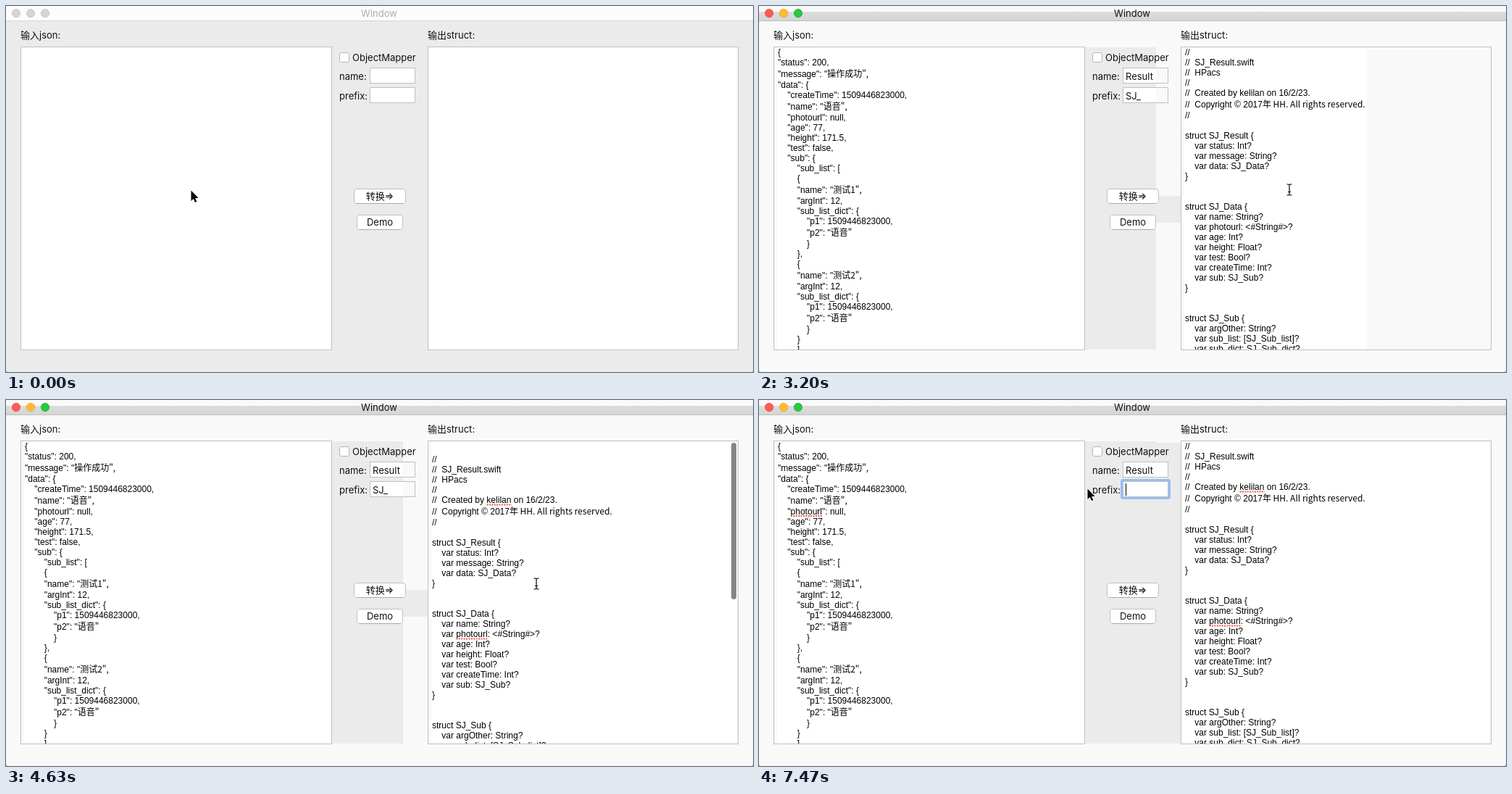
Animation of 1031x505 px, one loop 8 s. Source, as an HTML page:

```html
<!DOCTYPE html>
<html lang="zh">
<head>
<meta charset="utf-8">
<title>Window</title>
<style>
html, body { margin: 0; width: 100%; height: 100%; overflow: hidden; background: #b9bdc1; }
svg { display: block; width: 1031px; height: 505px; border-radius: 0 0 4px 4px; }
text { font: 13px Inter, "Noto Sans CJK SC", sans-serif; white-space: pre; fill: #111; }
.code text { font: 12px "Liberation Sans", Arial, sans-serif; fill: #000; }
.code .cjk { font-family: "Noto Sans CJK SC", sans-serif; }
.mid { text-anchor: middle; }
.line { fill: none; stroke: #c0c0c0; }
.ring { fill: none; stroke: #97bff5; stroke-width: 3; }
.spell { stroke: #f2554a; stroke-width: 2; stroke-dasharray: 2 1.4; }

/* Everything jumps, nothing glides: one 8 s clock with held steps */
.k { animation: 8s step-end -10ms infinite; }

@keyframes idle    { 0% { opacity: 1 } 22.125%, 100% { opacity: 0 } }
@keyframes press   { 0% { opacity: 0 } 22.125% { opacity: 1 } 24.375%, 100% { opacity: 0 } }
@keyframes loaded  { 0% { opacity: 0 } 24.375%, 100% { opacity: 1 } }
@keyframes output  { 0% { opacity: 0 } 28.75%, 100% { opacity: 1 } }
@keyframes cross   { 0% { opacity: 0 } 37.75%, 100% { opacity: 1 } }
@keyframes rolled  { 0% { opacity: 0 } 42.25%, 100% { opacity: 1 } }
@keyframes checked { 0% { opacity: 0 } 53.5%, 100% { opacity: 1 } }
@keyframes back    { 0% { opacity: 0 } 62.25%, 100% { opacity: 1 } }
@keyframes bar     { 0% { opacity: 0 } 42.25% { opacity: 1 } 73.375%, 100% { opacity: 0 } }
@keyframes blurred { 0% { opacity: 0 } 75.625%, 100% { opacity: 1 } }
@keyframes onName  { 0% { opacity: 0 } 75.625% { opacity: 1 } 80.125%, 100% { opacity: 0 } }
@keyframes onPrefix { 0% { opacity: 0 } 80.125%, 100% { opacity: 1 } }
@keyframes select  { 0% { opacity: 0 } 84.625% { opacity: 1 } 93.375%, 100% { opacity: 0 } }
@keyframes prefix  { 0% { opacity: 0 } 24.375% { opacity: 1 } 93.375%, 100% { opacity: 0 } }
@keyframes cleared { 0% { opacity: 0 } 93.375%, 100% { opacity: 1 } }

@keyframes scroll {
  0% { transform: translateY(0) }
  42.25% { transform: translateY(-25px) }
  44.5% { transform: translateY(-115px) }
  46.75% { transform: translateY(-210px) }
  49% { transform: translateY(-283px) }
  51.25% { transform: translateY(-300px) }
  53.5% { transform: translateY(-190px) }
  55.75% { transform: translateY(-40px) }
  57.875% { transform: translateY(18px) }
  60.125% { transform: translateY(4px) }
  62.25%, 100% { transform: translateY(0) }
}
@keyframes thumb {
  0% { transform: translateY(0); height: 226px }
  42.25% { transform: translateY(14px); height: 226px }
  44.5% { transform: translateY(63px); height: 226px }
  46.75% { transform: translateY(114px); height: 226px }
  49% { transform: translateY(154px); height: 226px }
  51.25% { transform: translateY(163px); height: 226px }
  53.5% { transform: translateY(103px); height: 226px }
  55.75% { transform: translateY(22px); height: 226px }
  57.875% { transform: translateY(0); height: 216px }
  60.125% { transform: translateY(0); height: 224px }
  62.25%, 100% { transform: translateY(0); height: 226px }
}
@keyframes move {
  0% { transform: translate(255px, 254px) }
  4.375% { transform: translate(283px, 262px) }
  6.625% { transform: translate(360px, 283px) }
  8.875% { transform: translate(455px, 302px) }
  11% { transform: translate(509px, 310px) }
  13.25% { transform: translate(511px, 301px) }
  35.5% { transform: translate(407px, 290px) }
  37.75% { transform: translate(575px, 262px) }
  40% { transform: translate(732px, 253px) }
  62.25% { transform: translate(500px, 150px) }
  64.5% { transform: translate(520px, 122px) }
  66.75% { transform: translate(541px, 106px) }
  68.875% { transform: translate(550px, 100px) }
  71.125% { transform: translate(551px, 98px) }
  73.375% { transform: translate(552px, 97px) }
  77.875% { transform: translate(556px, 108px) }
  80.125% { transform: translate(560px, 123px) }
  82.375% { transform: translate(535px, 124px) }
  84.625% { transform: translate(495px, 123px) }
  86.75%, 100% { transform: translate(453px, 122px) }
}
@keyframes arrow {
  0%, 37.75%, 62.25%, 86.75%, 100% { opacity: 1 }
  35.5%, 40%, 64.5% { opacity: 0 }
}
@keyframes beam {
  0%, 37.75%, 62.25%, 86.75%, 100% { opacity: 0 }
  35.5%, 40%, 64.5% { opacity: 1 }
}
@keyframes click {
  0%, 24.375%, 77.875%, 86.75%, 100% { opacity: 0 }
  22.125%, 75.625%, 80.125% { opacity: 1 }
}
</style>
</head>
<body>
<svg viewBox="0 0 1031 505">
  <defs>
    <linearGradient id="bar" x2="0" y2="1">
      <stop stop-color="#dcdcdc"/><stop offset="1" stop-color="#d5d5d5"/>
    </linearGradient>
    <linearGradient id="blue" x2="0" y2="1">
      <stop stop-color="#4c9bf8"/><stop offset=".48" stop-color="#3a8af5"/>
      <stop offset=".52" stop-color="#1d74f0"/><stop offset="1" stop-color="#0a63ea"/>
    </linearGradient>
    <clipPath id="paneL"><rect x="21" y="57" width="428" height="417"/></clipPath>
    <clipPath id="paneR"><rect x="583" y="57" width="427" height="417"/></clipPath>
    <g id="fills">
      <rect width="1031" height="505" fill="#ebebeb"/>
      <g fill="#fff">
        <rect x="20" y="56" width="430" height="419"/>
        <rect x="582" y="56" width="429" height="419"/>
        <rect x="502" y="85" width="63" height="22"/>
        <rect x="502" y="112" width="63" height="22"/>
        <rect x="460" y="64" width="14" height="14" rx="3"/>
        <rect x="480" y="252" width="72" height="21" rx="4"/>
        <rect x="484" y="288" width="64" height="21" rx="4"/>
      </g>
    </g>
  </defs>

  <rect width="1031" height="505" fill="#f9f9f9"/>
  <g id="patches"></g>

  <g>
    <rect y="8" width="1031" height="12" fill="url(#bar)"/>
    <path d="M0 20.5H1031" stroke="#c0c0c0"/>
    <circle cx="14" cy="10" r="5.7" fill="#fc5b57" stroke="#e2463f" stroke-width=".7"/>
    <circle cx="34" cy="10" r="5.7" fill="#fdbc2e" stroke="#dfa023" stroke-width=".7"/>
    <circle cx="54" cy="10" r="5.7" fill="#28c840" stroke="#1dac2b" stroke-width=".7"/>
    <text class="mid" x="515" y="15">Window</text>
  </g>
  <g class="k" style="animation-name:idle">
    <rect width="1031" height="20" fill="#fcfcfc"/>
    <path d="M0 20.5H1031" stroke="#d6d6d6"/>
    <g fill="#d4d4d4" stroke="#c2c2c2" stroke-width=".8">
      <circle cx="14" cy="10" r="5.6"/><circle cx="34" cy="10" r="5.6"/><circle cx="54" cy="10" r="5.6"/>
    </g>
    <text class="mid" x="515" y="15" style="fill:#adadad">Window</text>
  </g>

  <g class="line">
    <rect x="20.5" y="56.5" width="429" height="418"/>
    <rect x="582.5" y="56.5" width="428" height="418"/>
    <rect x="502.5" y="85.5" width="62" height="21"/>
    <rect x="502.5" y="112.5" width="62" height="21"/>
    <rect x="460.5" y="64.5" width="13" height="13" rx="2.5" stroke="#b4b4b4"/>
    <rect x="480.5" y="252.5" width="71" height="20" rx="3.5"/>
    <rect x="484.5" y="288.5" width="63" height="20" rx="3.5"/>
    <path d="M483.5 272.5H548.5M487.5 308.5H544.5" stroke="#aaa"/>
  </g>

  <text x="20" y="45">输入json:</text>
  <text x="582" y="45">输出struct:</text>
  <text x="478" y="76">ObjectMapper</text>
  <text x="460" y="102">name:</text>
  <text x="460" y="129">prefix:</text>
  <text class="mid" x="516" y="267">转换=&gt;</text>
  <text class="mid" x="516" y="303">Demo</text>
  <g class="k" style="animation-name:press">
    <rect x="484" y="288" width="64" height="21" rx="4" fill="url(#blue)"/>
    <text class="mid" x="516" y="303" style="fill:#fff">Demo</text>
    <path d="M26.5 57.5V71" stroke="#000"/>
  </g>

  <rect class="ring k" style="animation-name:onName" x="500.5" y="83.5" width="66" height="25" rx="2"/>
  <rect class="ring k" style="animation-name:onPrefix" x="500.5" y="110.5" width="66" height="25" rx="2"/>
  <rect class="k" style="animation-name:select" x="506" y="115" width="21" height="17" fill="#b3d7ff"/>
  <text class="k" style="animation-name:loaded" x="506" y="102">Result</text>
  <text class="k" style="animation-name:prefix" x="506" y="129">SJ_</text>
  <path class="k" style="animation-name:cleared" d="M506.5 115V132" stroke="#000"/>

  <g clip-path="url(#paneL)">
    <g id="json" class="code k" style="animation-name:loaded"></g>
    <path class="spell k" style="animation-name:blurred" d="M44 160H87"/>
  </g>
  <g clip-path="url(#paneR)">
    <g class="k" style="animation-name:scroll">
      <g id="swift" class="code k" style="animation-name:output"></g>
      <path class="spell k" style="animation-name:checked" d="M663.5 126.5H698M621.5 311.5H665"/>
    </g>
  </g>
  <g class="k" style="animation-name:bar">
    <rect class="k" style="animation-name:thumb" x="1001" y="59" width="7" height="226" rx="3.5" fill="#858585"/>
  </g>

  <g class="k" style="animation-name:move">
    <g class="k" style="animation-name:click" fill="none">
      <circle cx="2" r="9.5" stroke="#fff" stroke-width="3.5"/>
      <circle cx="2" r="9.5" stroke="#111" stroke-width="1.5"/>
    </g>
    <path class="k" style="animation-name:arrow" d="M.5 .5V15L3.8 11.9 6 17 8.3 16 6.1 11H10.6Z"
      stroke="#fff" stroke-width="1.6" paint-order="stroke"/>
    <g class="k" style="animation-name:beam" fill="none">
      <path id="ibeam" d="M-3.5-7H-1.5L0-6 1.5-7H3.5M0-6V7M-3.5 8H-1.5L0 7 1.5 8H3.5M-2 3.5H2" stroke="#fff" stroke-width="2.4" stroke-opacity=".7"/>
      <path d="M-3.5-7H-1.5L0-6 1.5-7H3.5M0-6V7M-3.5 8H-1.5L0 7 1.5 8H3.5M-2 3.5H2" stroke="#000" stroke-width="1.2"/>
    </g>
  </g>
</svg>

<script>
const json = `{
"status": 200,
"message": "操作成功",
"data": {
    "createTime": 1509446823000,
    "name": "语音",
    "photourl": null,
    "age": 77,
    "height": 171.5,
    "test": false,
    "sub": {
        "sub_list": [
        {
        "name": "测试1",
        "argInt": 12,
        "sub_list_dict": {
            "p1": 1509446823000,
            "p2": "语音"
            }
        },
        {
        "name": "测试2",
        "argInt": 12,
        "sub_list_dict": {
            "p1": 1509446823000,
            "p2": "语音"
            }
        }
        ]`;

const header = `//
//  SJ_Result.swift
//  HPacs
//
//  Created by kelilan on 16/2/23.
//  Copyright © 2017年 HH. All rights reserved.
//

`;

const struct = (name, vars) =>
  `struct SJ_${name} {\n${vars.split(', ').map(v => `    var ${v}?\n`).join('')}}`;

const swift = header + [
  struct('Result', 'status: Int, message: String, data: SJ_Data'),
  struct('Data', 'name: String, photourl: <#String#>, age: Int, height: Float, test: Bool, createTime: Int, sub: SJ_Sub'),
  struct('Sub', 'argOther: String, sub_list: [SJ_Sub_list], sub_dict: SJ_Sub_dict'),
  struct('Sub_list', 'argInt: Int, name: String, sub_list_dict: SJ_Sub_list_dict'),
  struct('Sub_list_dict', 'p2: String, p1: Int'),
  struct('Sub_dict', 'p2: String, p1: Int'),
].join('\n\n\n');

function add(parent, tag, attrs, text = '') {
  const el = document.createElementNS('http://www.w3.org/2000/svg', tag);
  for (const key in attrs) el.setAttribute(key, attrs[key]);
  el.textContent = text;
  return parent.appendChild(el);
}

// Lines with Chinese are taller; from the first such glyph on they use the CJK face
function typeset(id, x, source) {
  let top = 57;
  for (const line of source.split('\n')) {
    const cut = line.search(/[\u4e00-\u9fff]/), tall = cut >= 0;
    const text = add(document.getElementById(id), 'text', { x, y: top + (tall ? 13 : 11) },
      tall ? line.slice(0, cut) : line);
    if (tall) add(text, 'tspan', { class: 'cjk' }, line.slice(cut));
    top += tall ? 17 : 14;
  }
}
typeset('json', 26, json);
typeset('swift', 588, swift);

// The washed-out window regains its colours one repainted area at a time
const areas = {
  idle: [0, 0, 1031, 505],
  loaded: [25, 57, 523, 417],
  output: [587, 59, 252, 415],
  cross: [548, 262, 39, 37],
  rolled: [587, 57, 421, 417],
  back: [499, 59, 509, 415],
};
const patches = document.getElementById('patches');
for (const [name, [x, y, width, height]] of Object.entries(areas)) {
  const clip = add(patches, 'clipPath', { id: 'area-' + name });
  add(clip, 'rect', { x, y, width, height });
  const layer = add(patches, 'g', { class: 'k', style: 'animation-name:' + name });
  add(layer, 'use', { href: '#fills', 'clip-path': `url(#area-${name})` });
}
</script>
</body>
</html>
```
